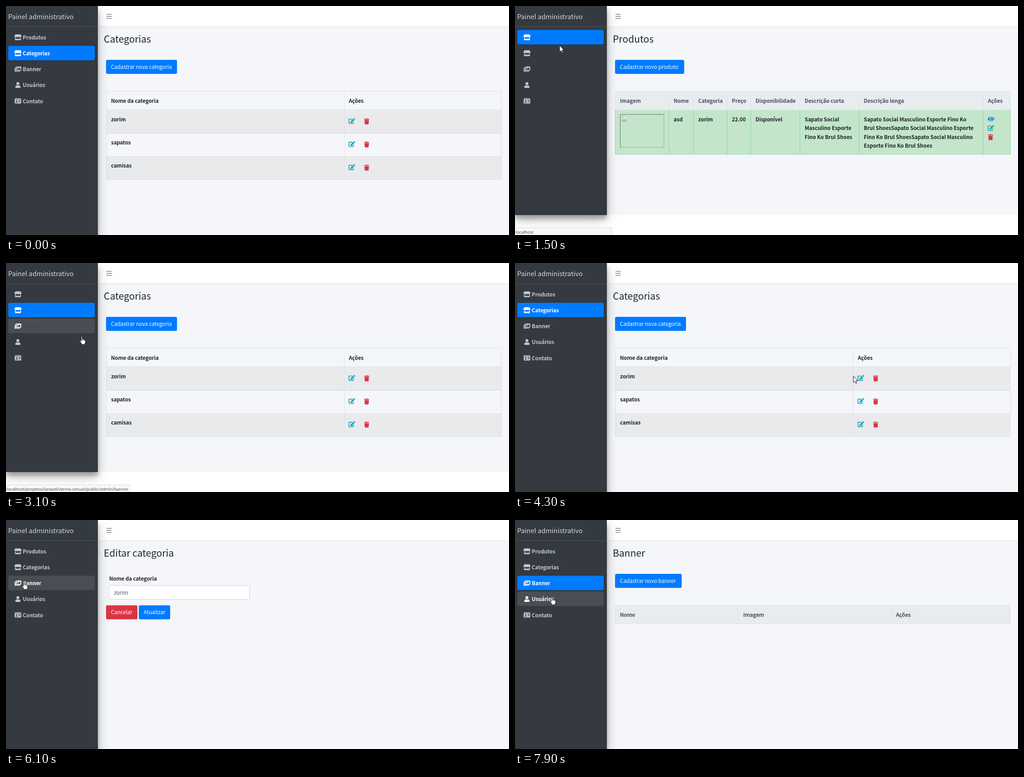
Animation of 1106x506 px, one loop 8000 ms. Source, as an HTML page:

```html
<!DOCTYPE html>
<html lang="pt">
<head>
<meta charset="utf-8">
<title>Painel administrativo</title>
<style>
html, body { margin: 0; width: 100%; height: 100%; overflow: hidden; background: #fff; }
#stage { position: relative; width: 1106px; height: 506px; overflow: hidden; }
#stage > * { position: absolute; left: 0; top: 0; }
#content { width: 1106px; background: #f4f6f9; }
#navbar { width: 1106px; height: 45px; background: #fff; border-bottom: 1px solid #dee2e6; }
#sidebar {
  width: 202px; background: #343a40;
  box-shadow: 0 11.3px 22.5px rgba(0,0,0,.25), 0 8px 8px rgba(0,0,0,.22);
}
text { font: 11.55px "Noto Sans CJK JP", "Noto Sans CJK SC", "Noto Sans CJK", "Noto Sans", sans-serif; fill: #212529; }
text.bold { font-weight: 700; letter-spacing: -.08px; }
text.title { font-size: 21px; }
text.brand { font-size: 14.6px; font-weight: 300; fill: rgba(255,255,255,.8); }
text.status { font: 9.34px "Open Sans", "Noto Sans", sans-serif; fill: #3c4043; }
</style>
</head>
<body>
<div id="stage">
  <div id="content"></div>
  <div id="navbar"></div>
  <div id="sidebar"></div>
  <svg id="art" width="1106" height="506" viewBox="0 0 1106 506"></svg>
</div>
<script>
const LOOP = 8000, STEP = 100;
const BLUE = '#007bff', RED = '#dc3545', TEAL = '#17a2b8', INK = '#212529', GREY = '#495057', LINE = '#dee2e6';
const BRAND = 'zorim';
const $ = id => document.getElementById(id);

// Icon outlines on a 512-unit grid
const ICONS = {
  store: 'M602 119L537 15Q528 0 510 0H106Q88 0 79 15L14 119C-20 172 10 256 87 256q44 0 73-33q30 33 74 33t74-33q30 33 74 33t74-33q30 33 73 33c77 0 107-84 73-137zM530 288q-15 0-30-4V384H116V284q-30 8-64-1V480q0 32 32 32H532q32 0 32-32V283q-16 5-34 5z',
  images: 'M480 416v16q0 48-48 48H48q-48 0-48-48V176q0-48 48-48h16v208q0 80 80 80zM576 336V80q0-48-48-48H144q-48 0-48 48v256q0 48 48 48h384q48 0 48-48zM256 128a48 48 0 1 0-96 0a48 48 0 1 0 96 0zM160 272l56-56q8-8 16 0l40 40 136-136q8-8 16 0l88 88v112H160z',
  user: 'M224 256a128 128 0 1 0 0-256a128 128 0 1 0 0 256zM314 288h-17q-73 32-146 0h-17Q0 296 0 422v42q0 48 48 48h352q48 0 48-48v-42Q448 296 314 288z',
  card: 'M528 32H48Q0 32 0 80v16h576V80q0-48-48-48zM0 432q0 48 48 48h480q48 0 48-48V128H0zM176 192a64 64 0 1 1 0 128a64 64 0 1 1 0-128zM64 416q0-60 60-64q52 18 104 0q60 4 60 64zM352 192h160v32H352zM352 256h160v32H352zM352 320h160v32H352z',
  edit: 'M402 84l90 90q6 6 0 13L274 405l-93 10q-20 2-20-18l10-93L389 84q6-6 13 0zM565 61l-49-49q-28-20-52 0l-35 35q-6 6 0 13l90 90q6 6 13 0l35-35q20-26-2-54zM384 346V448H64V128h230q5 0 9-4l40-40q8-20-9-20H48Q0 64 0 112v352q0 48 48 48h352q48 0 48-48V306q0-17-20-9l-40 40q-4 4-4 9z',
  trash: 'M432 32H312l-9-19Q296 0 281 0H167q-15 0-22 13l-9 19H16Q0 32 0 48v32q0 16 16 16h416q16 0 16-16V48q0-16-16-16zM53 467q3 45 48 45h246q45 0 48-45l21-339H32z',
  eye: 'M573 241C518 136 411 64 288 64S58 136 3 241q-6 15 0 30C58 376 165 448 288 448s230-72 285-177q6-15 0-30zM288 400a144 144 0 1 1 0-288a144 144 0 0 1 0 288zm0-240a95 95 0 0 0-25 4a48 48 0 0 1-67 67a96 96 0 1 0 92-71z'
};

const rect = (x, y, w, h, fill, more = '') => `<rect x="${x}" y="${y}" width="${w}" height="${h}" fill="${fill}" ${more}/>`;
const path = (d, stroke, width = 1) => `<path d="${d}" fill="none" stroke="${stroke}" stroke-width="${width}"/>`;
const icon = (name, x, y, fill) =>
  `<path d="${ICONS[name]}" fill="${fill}" fill-rule="evenodd" transform="translate(${x} ${y}) scale(.0252)"/>`;
// y is the middle of the line box
const text = (s, x, y, cls = '', fill = '') =>
  `<text x="${x}" y="${y + 4.5}" class="${cls}"${fill && ` style="fill:${fill}"`}>${s}</text>`;
const bold = (s, x, y, fill) => text(s, x, y, 'bold', fill);
const title = s => `<text x="215" y="81" class="title">${s}</text>`;
const button = (s, x, y, w, fill, id = '') =>
  rect(x, y, w, 31, fill, `rx="3"${id && ` id="${id}"`}`) + text(s, x + 10.8, y + 15.2, '', '#fff');

const grid = (cols, top, bottom, color) =>
  path(`M220 ${top}.5H1090M220 ${bottom}.5H1090` + cols.map(x => `M${x}.5 ${top}V${bottom + 1}`).join(''), color);
const headRow = (cols, names, dark) =>
  (dark ? rect(220, 188, 870, 41, '#e9ecef') : '') +
  grid(cols, 188, 229, LINE) +
  names.map((s, i) => bold(s, cols[i] + 10.8, 209, dark ? GREY : INK)).join('');

function categoriesPage() {
  const cols = [220, 743, 1089];
  const rows = [BRAND, 'sapatos', 'camisas'].map((name, i) => {
    const y = 229 + 51 * i + (i > 0);
    return (i % 2 ? '' : rect(220, y, 870, 52, 'rgba(0,0,0,.05)')) +
      grid(cols, y, 280 + 51 * i + (i > 0), LINE) +
      bold(name, 231, 250 + 51.1 * i) +
      icon('edit', 753.3, 247.3 + 51.1 * i, TEAL) + icon('trash', 787.4, 248.5 + 51.1 * i, RED);
  }).join('');
  return title('Categorias') + button('Cadastrar nova categoria', 220, 119, 156, BLUE) +
    rows + headRow(cols, ['Nome da categoria', 'Ações']);
}

function productsPage() {
  const cols = [220, 338, 392, 466, 518, 626, 756, 1029, 1089];
  const lines = (list, x) => list.map((s, i) => bold(s, x, 250 + 19.5 * i)).join('');
  const shoe = 'Sapato Social Masculino';
  const image = path('M327.5 239V312.5H231', '#98a59c') + path('M231.5 313V239.5H328', '#666f69') +
    `<path d="M235.5 243.5h6l3.5 3.5v8h-9.5z" fill="#eef3f0" stroke="#9aa7a0" stroke-width=".8"/>` +
    `<path d="M236 252l4-4 4.5 5v2H236z" fill="#a9b8ae"/><path d="M236.5 245h4v2h-4z" fill="#b9cce0"/>`;
  return title('Produtos') + button('Cadastrar novo produto', 220, 119, 152, BLUE) +
    rect(220, 230, 870, 98, '#c3e6cb') + grid(cols, 229, 327, '#8fd19e') +
    headRow(cols, ['Imagem', 'Nome', 'Categoria', 'Preço', 'Disponibilidade', 'Descrição curta', 'Descrição longa', 'Ações'], true) +
    image +
    ['asd', BRAND, '22.00', 'Disponível'].map((s, i) => bold(s, cols[i + 1] + 10.8, 250)).join('') +
    lines(['Sapato Social', 'Masculino Esporte', 'Fino Ko Brul Shoes'], 637) +
    lines([shoe + ' Esporte Fino Ko', `Brul Shoes${shoe} Esporte`, 'Fino Ko Brul Shoes' + shoe, 'Esporte Fino Ko Brul Shoes'], 767) +
    icon('eye', 1039.2, 243.2, BLUE) + icon('edit', 1039.2, 262.6, TEAL) + icon('trash', 1040, 283.4, RED);
}

function editPage() {
  return title('Editar categoria') + bold('Nome da categoria', 226.8, 129) +
    rect(226.5, 144.5, 309, 31, '#fff', 'rx="3" stroke="#ced4da"') + text(BRAND, 237.5, 160.4, '', GREY) +
    button('Cancelar', 220, 188.5, 69, RED) + button('Atualizar', 292, 188.5, 69, BLUE);
}

function bannerPage() {
  return title('Banner') + button('Cadastrar novo banner', 220, 119, 146.5, BLUE, 'newBanner') +
    headRow([220, 491, 827, 1089], ['Nome', 'Imagem', 'Ações'], true);
}

const MENU = [['Produtos', 'store', 18.5], ['Categorias', 'store', 18.5], ['Banner', 'images', 19], ['Usuários', 'user', 20.5], ['Contato', 'card', 19]];
const pillTop = i => 53 + 35.15 * i;

function menu() {
  return MENU.map(([name, pic, x], i) => {
    const y = pillTop(i);
    return rect(5, Math.round(y), 190, 32, 'none', `rx="3.2" id="pill${i}"`) +
      `<g id="pic${i}">${icon(pic, x, y + 9.7, 'inherit')}</g>` +
      `<g id="label${i}">${bold(name, 36.8, y + 16.4, 'inherit')}</g>`;
  }).join('');
}

const ARROW = 'M.5.5V15.2L3.8 12.1 6 17 8.2 16.1 6.1 11.3H10.3z';
const HAND = 'M3.6 1.5C3.6-.2 6.1-.2 6.1 1.5V7C7.2 6.2 8.4 6.5 8.6 7.6 9.6 6.9 10.8 7.3 10.9 8.4 12 7.9 13 8.6 13 9.8V13C13 15 11.5 16 11.3 18.5H5C4.8 16.5 2.5 14.5.8 11.6 0 10 1.6 9.2 2.6 10.4L3.6 11.5z';

const PAGES = { categories: categoriesPage, products: productsPage, edit: editPage, banner: bannerPage };
const ACTIVE = { categories: 1, products: 0, edit: -1, banner: 2 };

$('art').innerHTML =
  path('M221 18.6H232.3M221 23H232.3M221 27.4H232.3', '#7f7f7f', 1.5) +
  path('M0 45.5H202', '#4b545c') +
  '<text x="4.8" y="29.2" class="brand">Painel administrativo</text>' + menu() +
  Object.keys(PAGES).map(p => `<g id="${p}">${PAGES[p]()}</g>`).join('') +
  `<g id="status">${rect(-1, 490.5, 10, 20, '#f8f9fa', 'id="bubble" stroke="#d5d8dc"')}<text id="url" x="1.6" y="503.4" class="status"></text></g>` +
  `<g id="arrow"><path d="${ARROW}" fill="#fff" stroke="#000" stroke-width=".9"/></g>` +
  `<g id="hand"><path d="${HAND}" fill="#fff" stroke="#000" stroke-width=".9"/>${path('M8.6 7.6v2.8M10.9 8.4v2.4M6.1 7v3', '#000', .8)}</g>`;

// start, time the page reaches full height, time the menu labels show
const LOADS = [
  { page: 'categories', at: -900, tall: -500, labels: -500 },
  { page: 'products', at: 1500, tall: 1700, labels: 1700 },
  { page: 'categories', at: 3000, tall: 3200, labels: 3200 },
  { page: 'edit', at: 4800, tall: 5000, labels: 5300 },
  { page: 'banner', at: 6800, tall: 7000, labels: 7100 }
];

const ADMIN = 'localhost/projetos/laravel/vitrine-virtual/public/admin/';
const STATUS = [
  [900, 1400, ADMIN + 'produtos', 281], [1400, 1700, 'localhost', 213],
  [2300, 2900, ADMIN + 'categorias', 286], [2900, 3000, 'localhost', 213],
  [3000, 3300, ADMIN + 'banner', 273], [4600, 5000, 'localhost', 213],
  [6500, 6800, ADMIN + 'banner', 273], [6800, 7000, 'localhost', 213]
];

// time, x, y of the pointer tip
const TRACK = [
  [200, 185, 4], [1000, 97, 76], [1400, 97, 76], [1500, 97.5, 86.5], [1600, 97.5, 86.5], [2500, 66, 109],
  [2700, 68, 110], [2900, 68, 110], [3000, 110, 130], [3100, 166.5, 161.5], [3700, 294, 199], [3900, 683, 252],
  [4000, 683, 252], [4300, 743.5, 249], [4400, 757, 251], [4700, 757, 251], [5100, 282, 196], [5200, 282, 196],
  [5600, 195.5, 181], [5700, 195.5, 181], [6100, 39.6, 135], [6300, 41, 136], [6900, 41, 136],
  [7200, 262, 172], [7300, 328.4, 147.5], [7400, 325, 143], [7500, 325, 143], [7600, 300, 151.5], [7900, 81.2, 168.7]
];

function pointer(t) {
  const i = Math.max(1, TRACK.findIndex(k => k[0] >= t));
  const [t0, x0, y0] = TRACK[i - 1], [t1, x1, y1] = TRACK[i];
  const k = Math.min(1, Math.max(0, (t - t0) / (t1 - t0)));
  return { x: x0 + (x1 - x0) * k, y: y0 + (y1 - y0) * k };
}

const within = (p, x, y, w, h) => p.x >= x && p.x <= x + w && p.y >= y && p.y <= y + h;
const menuAt = p => MENU.findIndex((m, i) => within(p, 5, pillTop(i), 190, 32.3));
const onButton = (p, page) => page === 'banner' && within(p, 220, 119, 146.5, 31);
const onEdit = (p, page) => page === 'categories' && within(p, 753, 247, 15, 14);
const show = (id, on) => $(id).setAttribute('visibility', on ? 'visible' : 'hidden');

function draw(t) {
  const load = LOADS.filter(l => l.at <= t).pop(), page = load.page;
  const height = t < load.tall ? 461 : 506;
  $('content').style.height = height + 'px';
  $('sidebar').style.height = height + 1 + 'px';
  for (const p in PAGES) $(p).style.display = p === page ? '' : 'none';

  const here = pointer(t), seen = t >= 200;
  const before = pointer(t - STEP); // hover colours trail the pointer
  const hover = t > 200 ? menuAt(before) : -1;
  const faded = t < load.labels;
  MENU.forEach((m, i) => {
    const active = i === ACTIVE[page], lit = active || i === hover;
    const color = lit ? '#fff' : '#c2c7d0';
    const pill = $('pill' + i), label = $('label' + i);
    pill.setAttribute('fill', active ? BLUE : lit ? 'rgba(255,255,255,.1)' : 'none');
    pill.style.filter = active ? 'drop-shadow(0 1px 1px rgba(0,0,0,.2))' : 'none';
    $('pic' + i).firstChild.setAttribute('fill', color);
    label.setAttribute('fill', faded ? '#000' : color);
    label.setAttribute('opacity', faded ? .04 : 1);
  });
  $('newBanner').setAttribute('fill', onButton(before, page) ? '#0069d9' : BLUE);

  const status = STATUS.find(s => t >= s[0] && t < s[1]);
  show('status', status);
  if (status) {
    $('url').textContent = status[2];
    $('bubble').setAttribute('width', status[3] + .5);
  }

  const link = menuAt(here) >= 0 || onButton(here, page) || onEdit(here, page);
  show('arrow', seen && !link);
  show('hand', seen && link);
  $('arrow').setAttribute('transform', `translate(${here.x} ${here.y})`);
  $('hand').setAttribute('transform', `translate(${here.x - 4.8} ${here.y})`);
}

const start = performance.now();
let last = -1;
function tick() {
  const t = Math.floor((performance.now() - start) % LOOP / STEP) * STEP;
  if (t !== last) draw(last = t);
  requestAnimationFrame(tick);
}
tick();
</script>
</body>
</html>
```
